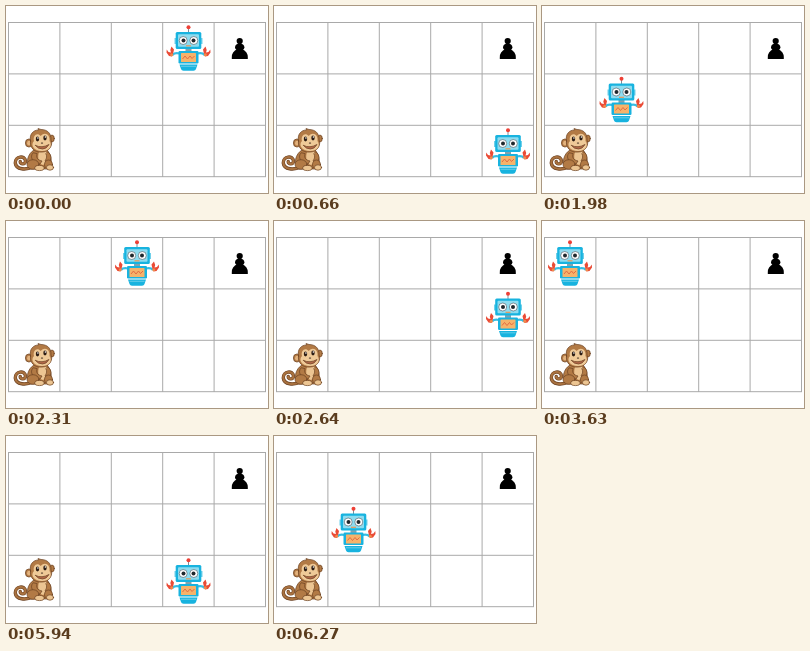
These frames come from a looping animation (262 by 187 pixels, 6.93 s). An HTML page:

```html
<!DOCTYPE html>
<html lang="en">
<head>
<meta charset="utf-8">
<title>Robot on a grid</title>
<style>
  html, body { margin: 0; width: 100%; height: 100%; overflow: hidden; background: #fff; }
  svg { display: block; width: 100vw; height: 100vh; }
</style>
</head>
<body>
<svg viewBox="0 0 262 187">
  <defs>
    <g id="arm">
      <path d="M9 28.500Q14 27.500 16 30" fill="none" stroke="#35bde3" stroke-width="2.200"/>
      <path d="M15.500 29L14.500 24.500L17 21.500L18.200 25L17.500 27.500L20 27L21.800 24.500L22 27.500L19.500 31L16.500 31.500Z" fill="#ea4b36"/>
      <circle cx="16.800" cy="29.800" r="1.500" fill="#f08a4b"/>
    </g>
    <path id="tail" d="M27 161C20 164 10 164 9.300 157C9 150 19 149 19.500 155C19.300 159 14 158.500 14.200 155.500" fill="none"/>
  </defs>

  <path id="grid" fill="none" stroke="#a9a9a9"/>

  <g id="monkey" stroke="#6b4122" stroke-width=".7" stroke-linejoin="round" stroke-linecap="round">
    <use href="#tail" stroke-width="3.400"/>
    <use href="#tail" stroke="#a8713f" stroke-width="2.200"/>
    <path d="M28 144C21 148 19 158 25 163H42C47 159 46 149 41 144Z" fill="#b27a45"/>
    <path d="M33 146C31 152 33 158 37 159C42 157 43 151 40 145Z" fill="#ecc592" stroke="none"/>
    <path d="M27 147C23 151 27 157 34 158L36 155C31 154 30 151 31 148Z" fill="#b27a45"/>
    <path d="M42 146C46 149 46 154 42 157L39 155C41 152 41 150 40 148Z" fill="#b27a45"/>
    <ellipse cx="27" cy="158.500" rx="6" ry="4.800" fill="#b27a45"/>
    <ellipse cx="42.500" cy="158.500" rx="4" ry="4.500" fill="#b27a45"/>
    <ellipse cx="33.500" cy="162" rx="4.800" ry="2.600" fill="#ecc592"/>
    <ellipse cx="44" cy="161.500" rx="3.600" ry="2.700" fill="#ecc592"/>
    <ellipse cx="22.800" cy="137" rx="3.400" ry="4" fill="#b27a45"/>
    <ellipse cx="23" cy="137.200" rx="1.900" ry="2.400" fill="#e3b37e" stroke="none"/>
    <ellipse cx="46" cy="132.500" rx="2.300" ry="3.500" fill="#b27a45"/>
    <path d="M24.500 135C23 128 27.500 124 32.500 124L32 122.500L35 123.500C41 123.500 45.500 127 45 134C47.500 139 43 146 36 146C28 147 23.500 141 24.500 135Z" fill="#b27a45"/>
    <path d="M34.700 130C31 125.500 26.500 130 28 135C24 139 28 145 36 145C43 145 47 140 43.500 135C44.500 129 39 125 34.700 130Z" fill="#efca98" stroke="none"/>
    <g fill="#2c1c13" stroke="none">
      <ellipse cx="31.500" cy="133" rx="1.700" ry="2.400"/><ellipse cx="39" cy="132" rx="1.700" ry="2.400"/>
      <ellipse cx="36" cy="137" rx="1.200" ry=".6"/>
    </g>
    <g fill="#fff" stroke="none"><circle cx="31.900" cy="132" r=".8"/><circle cx="39.400" cy="131" r=".8"/></g>
    <path d="M29.500 139.500Q36 142.500 43 138.500Q40.500 143 36.500 143Q32 143 29.500 139.500Z" fill="#b4694a"/>
  </g>

  <g id="robot">
    <path d="M0 3V8" stroke="#7c8e98"/>
    <circle cy="2.300" r="2" fill="#ee4036"/>
    <use href="#arm"/><use href="#arm" transform="scale(-1 1)"/>
    <rect x="-3" y="22" width="6" height="5" fill="#7fa3b0"/>
    <path d="M-14 13H14V19H-14Z" fill="#70d0ea"/>
    <rect x="-12.800" y="7" width="25.600" height="17" rx="1.500" fill="#18b3df"/>
    <rect x="-10.500" y="9.200" width="21" height="12.600" rx="1" fill="#8ddcf0"/>
    <g fill="#fff" stroke="#40535d" stroke-width=".6"><circle cx="-5.300" cy="15.500" r="4"/><circle cx="5.300" cy="15.500" r="4"/></g>
    <g fill="#20282d"><circle cx="-5" cy="15.500" r="2"/><circle cx="5" cy="15.500" r="2"/></g>
    <path d="M-2.500 20.800H2.500" stroke="#e99a58" stroke-width="1.200"/>
    <rect x="-10" y="26" width="20" height="12.500" rx="1.200" fill="#18b3df"/>
    <rect x="-7.500" y="28" width="15" height="9" rx=".6" fill="#f6b36a"/>
    <path d="M-6 34L-3.500 31L-1 34L1.500 31L3.500 33.500L6 31" fill="none" stroke="#e0643f" stroke-width=".9"/>
    <path d="M-9 39.500H9L7.500 44Q7 45.800 5 45.800H-5Q-7 45.800 -7.500 44Z" fill="#18b3df"/>
    <path d="M-7.500 41.300H7.500" stroke="#78d5ec" stroke-width=".8"/>
  </g>

  <g id="pawn">
    <circle cx="233.700" cy="35" r="3.100"/>
    <ellipse cx="233.700" cy="41.200" rx="4.700" ry="3.700"/>
    <path d="M231 43H236.400Q241.800 46 241.800 51V53H225.800V51Q225.800 46 231 43Z"/>
  </g>
</svg>
<script>
const LOOP = 6930, LINE_GAP = 51.4, STEP = 51.5;

// [start time, column, row]
const stops = [
  [0, 3, 0], [660, 4, 2], [990, 3, 1], [1320, 2, 2], [1980, 1, 1], [2310, 2, 0],
  [2640, 4, 1], [3630, 0, 0], [5610, 4, 0], [5940, 3, 2], [6270, 1, 1]
];

let grid = "";
for (let c = 0; c <= 5; c++) grid += `M${2.5 + c * LINE_GAP} 16V171`;
for (let r = 0; r <= 3; r++) grid += `M2 ${16.5 + r * LINE_GAP}H260`;
document.getElementById("grid").setAttribute("d", grid);

const robot = document.getElementById("robot");

function draw(time) {
  const t = time % LOOP;
  const [, col, row] = stops.findLast(([start]) => start <= t);
  robot.setAttribute("transform", `translate(${28 + col * STEP} ${19 + row * STEP})`);
}

function tick() {
  draw(performance.now());
  requestAnimationFrame(tick);
}
tick();
</script>
</body>
</html>
```
